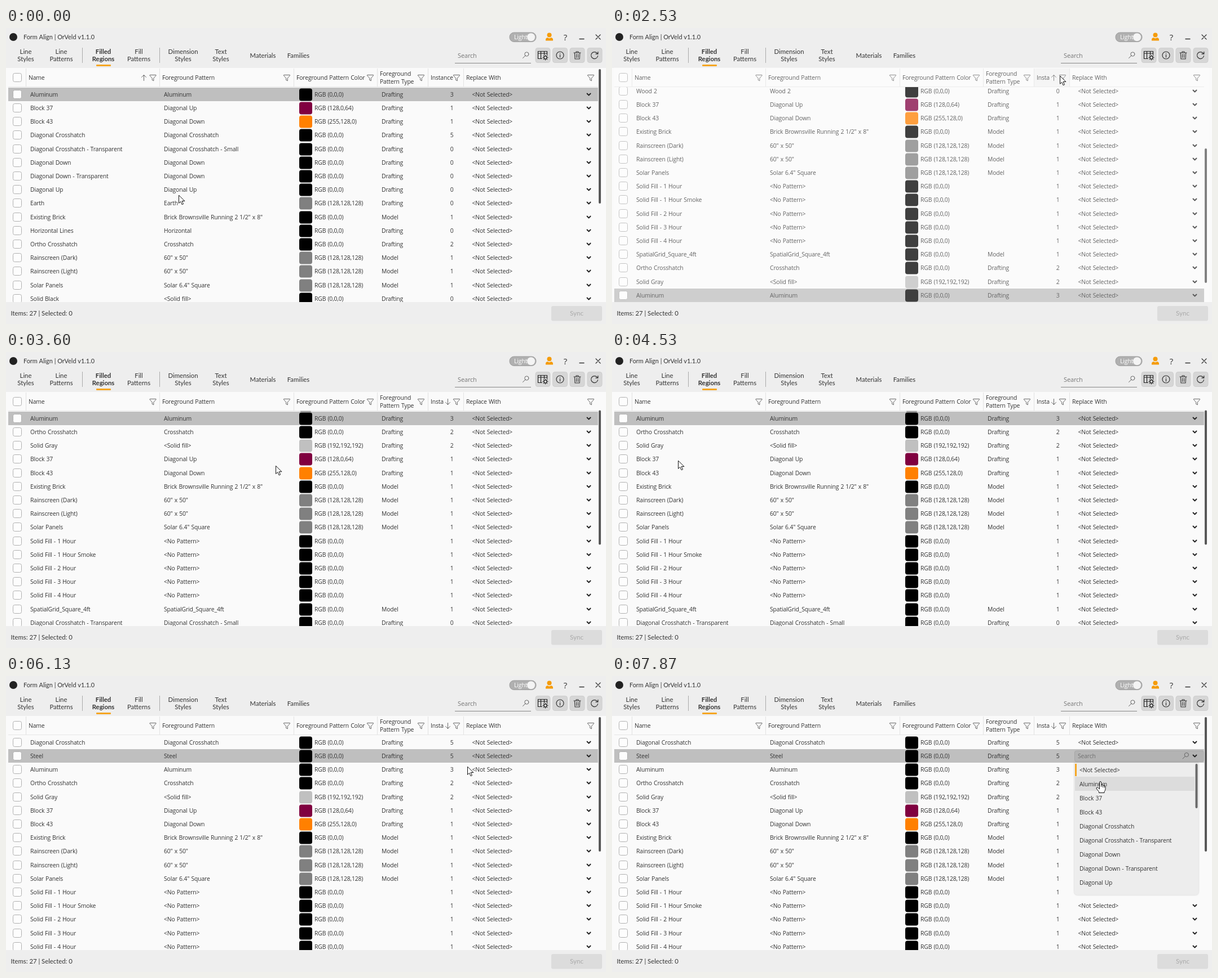
These frames come from a looping animation (1064 px wide and 526 px high, 8 s). An HTML page with a canvas:

```html
<!DOCTYPE html>
<html lang="en">
<head>
<meta charset="utf-8">
<title>Filled regions table</title>
<style>
html, body { margin: 0; width: 100%; height: 100%; overflow: hidden; background: #eee; }
canvas { display: block; width: 1064px; height: 526px; }
</style>
</head>
<body>
<canvas id="stage"></canvas>
<script>
const W = 1064, H = 526, LOOP = 8000, STEP = 1000 / 15;
const ROW = 24.2, TOP = 117.8, BOTTOM = 487;
const INK = '#333', ORANGE = '#f5a623';
const UI = '"Open Sans", "Noto Sans", sans-serif', BRAND = 'Lato, "Open Sans", sans-serif';

const canvas = document.getElementById('stage');
const ctx = canvas.getContext('2d');
const dpr = window.devicePixelRatio || 1;
canvas.width = W * dpr;
canvas.height = H * dpr;

// name | pattern | color | type | instances
const rows = `Aluminum|Aluminum|0,0,0|Drafting|3
Block 37|Diagonal Up|128,0,64|Drafting|1
Block 43|Diagonal Down|255,128,0|Drafting|1
Diagonal Crosshatch|Diagonal Crosshatch|0,0,0|Drafting|5
Diagonal Crosshatch - Transparent|Diagonal Crosshatch - Small|0,0,0|Drafting|0
Diagonal Down|Diagonal Down|0,0,0|Drafting|0
Diagonal Down - Transparent|Diagonal Down|0,0,0|Drafting|0
Diagonal Up|Diagonal Up|0,0,0|Drafting|0
Earth|Earth|128,128,128|Drafting|0
Existing Brick|Brick Brownsville Running 2 1/2" x 8"|0,0,0|Model|1
Horizontal Lines|Horizontal|0,0,0|Drafting|0
Ortho Crosshatch|Crosshatch|0,0,0|Drafting|2
Rainscreen (Dark)|60" x 50"|128,128,128|Model|1
Rainscreen (Light)|60" x 50"|128,128,128|Model|1
Solar Panels|Solar 6.4" Square|128,128,128|Model|1
Solid Black|<Solid fill>|0,0,0|Drafting|0
Solid Fill - 1 Hour|<No Pattern>|0,0,0||1
Solid Fill - 1 Hour Smoke|<No Pattern>|0,0,0||1
Solid Fill - 2 Hour|<No Pattern>|0,0,0||1
Solid Fill - 3 Hour|<No Pattern>|0,0,0||1
Solid Fill - 4 Hour|<No Pattern>|0,0,0||1
Solid Gray|<Solid fill>|192,192,192|Drafting|2
Solid White|<Solid fill>|255,255,255|Drafting|0
SpatialGrid_Square_4ft|SpatialGrid_Square_4ft|0,0,0|Model|1
Steel|Steel|0,0,0|Drafting|5
Wood 1|Wood 1|0,0,0|Drafting|0
Wood 2|Wood 2|0,0,0|Drafting|0`.split('\n').map(line => {
  const [name, pattern, color, type, count] = line.split('|');
  return { name, pattern, color, type, count: +count };
});
const orders = {
  name: rows,
  up: [...rows].sort((a, b) => a.count - b.count),
  down: [...rows].sort((a, b) => b.count - a.count)
};

// pointer path: step, x, y
const path = [
  [0, 306, 297], [3, 400, 268], [6, 474, 190], [8, 410, 122], [11, 210, 117], [13, 123, 138],
  [17, 215, 112], [21, 425, 86], [25, 634, 74], [26, 641, 73], [28, 700, 75], [31, 794, 85], [47, 794, 85],
  [48, 791, 98], [49, 782, 124], [52, 620, 200], [56, 340, 190], [59, 205, 165],
  [60, 205, 165], [65, 118, 138], [66, 118, 138], [67, 109, 166], [68, 117, 193], [72, 117, 193],
  [73, 112, 172], [74, 107, 151], [75, 107, 151], [78, 190, 350], [81, 320, 460], [84, 460, 380], [88, 611, 166],
  [89, 680, 166], [92, 818, 161], [96, 872, 150], [101, 888, 140], [106, 880, 150], [112, 880, 150],
  [116, 864, 191], [121, 864, 191]
];

function slope(i, c) {
  const a = path[i - 1], p = path[i], b = path[i + 1];
  if (!a || !b || a[c] === p[c] || b[c] === p[c]) return 0;
  return (b[c] - a[c]) / (b[0] - a[0]);
}

function pointerAt(k) {
  let i = 0;
  while (i < path.length - 2 && k >= path[i + 1][0]) i++;
  const a = path[i], b = path[i + 1], d = b[0] - a[0], u = (k - a[0]) / d;
  return [1, 2].map(c =>
    (2 * u ** 3 - 3 * u * u + 1) * a[c] + (u ** 3 - 2 * u * u + u) * d * slope(i, c) +
    (3 * u * u - 2 * u ** 3) * b[c] + (u ** 3 - u * u) * d * slope(i + 1, c));
}

function stateAt(k) {
  return {
    sort: k < 38 ? 'name' : k < 50 ? 'up' : 'down',
    offset: k < 38 ? 0 : k < 50 ? 223.8 : k < 70 ? 2 * ROW : k < 71 ? ROW : 0,
    veil: k < 35 || k > 38 ? 0 : k < 38 ? 0.5 : 0.25,
    selected: k < 76 ? 'Aluminum' : 'Steel',
    hover: k >= 20 && k < 26 ? 'pattern' : k >= 30 && k < 50 ? 'instance' : '',
    open: k < 102 ? 0 : Math.min(1, (k - 101) / 5),
    item: k >= 115 ? 1 : -1,
    hand: k >= 118
  };
}

function text(s, x, y, o = {}) {
  ctx.font = `${o.weight || 400} ${o.size || 10.4}px ${o.font || UI}`;
  ctx.letterSpacing = o.font ? '0px' : '-0.15px';
  ctx.wordSpacing = o.font ? '0px' : '0.6px';
  ctx.textAlign = o.align || 'left';
  ctx.fillStyle = o.color || INK;
  ctx.fillText(s, x, y);
}
const brand = (s, x, y, o = {}) => text(s, x, y, { font: BRAND, size: 11.3, ...o });

function rect(x, y, w, h, color) {
  ctx.fillStyle = color;
  ctx.fillRect(x, y, w, h);
}

function box(x, y, w, h, r, fill, line) {
  ctx.beginPath();
  ctx.roundRect(x, y, w, h, r);
  if (fill) { ctx.fillStyle = fill; ctx.fill(); }
  if (line) { ctx.strokeStyle = line; ctx.lineWidth = 1; ctx.stroke(); }
}

function disc(x, y, r, color) {
  ctx.beginPath();
  ctx.arc(x, y, r, 0, 7);
  ctx.fillStyle = color;
  ctx.fill();
}

// stroke or fill an SVG path at a position
function glyph(d, x, y, line, width = 1, fill) {
  const p = new Path2D(d);
  ctx.save();
  ctx.translate(x, y);
  ctx.lineJoin = ctx.lineCap = 'round';
  if (fill) { ctx.fillStyle = fill; ctx.fill(p); }
  if (line) { ctx.strokeStyle = line; ctx.lineWidth = width; ctx.stroke(p); }
  ctx.restore();
}

const funnel = (x, color = '#666') => glyph('M-5-5H5.5V-4L1.3.7V5.3L-1.3 4V.7L-5.5-4Z', x, 88.5, color);
const sortArrow = (x, up) =>
  glyph(up ? 'M0 5V-5M-4-1L0-5L4-1' : 'M0-5V5M-4 1L0 5L4 1', x, 88.5, '#666');
const lens = (x, y) => glyph('M5.5-2A3.6 3.6 0 1 1-1.7-2A3.6 3.6 0 1 1 5.5-2M-.6.7L-5 5', x, y, '#666');
const chevron = y => glyph('M-3-1.5L0 1.5L3-1.5', 1033.5, y, '#222', 1.9);
const checkbox = y => box(12.5, y - 7.5, 15, 15, 3, '#fdfdfd', '#b0b0b0');

function drawTitleBar() {
  disc(13, 16, 7, '#222');
  brand('Form Align | OrVeld v1.1.0', 31, 20, { size: 10.9 });
  box(893, 8, 47, 16.5, 8, '#b0b0b0', '#9c9c9c');
  text('Light', 901, 20, { color: '#fff', size: 10.5 });
  disc(931, 16.3, 7, '#f4f4f4');
  disc(963.5, 12.5, 4, '#f59c0b');
  glyph('M-6.5 6V4Q-6.5 1-3 .5Q0 3 3 .5Q6.5 1 6.5 4V6Z', 963.5, 16.5, null, 0, '#f59c0b');
  text('?', 992, 21.5, { size: 15, align: 'center' });
  glyph('M-4 0H4', 1021, 19.5, INK, 1.3);
  glyph('M-4-4L4 4M4-4L-4 4', 1050, 16, INK, 1.2);
}

function drawTabs() {
  const tabs = [[35, 'Line', 'Styles'], [98, 'Line', 'Patterns'], [172.5, 'Filled', 'Regions'],
    [235.5, 'Fill', 'Patterns'], [314, 'Dimension', 'Styles'], [381, 'Text', 'Styles']];
  for (const [x, a, b] of tabs) {
    const o = { align: 'center', weight: a === 'Filled' ? 700 : 400 };
    brand(a, x, 46, o);
    brand(b, x, 59, o);
  }
  brand('Materials', 455.5, 52.5, { align: 'center' });
  brand('Families', 518.5, 52.5, { align: 'center' });
  rect(135, 35, 1, 27, '#aaa');
  rect(272, 35, 1, 27, '#aaa');
  box(160, 65, 26, 3, 1, ORANGE);

  text('Search', 801, 52.5, { color: '#777', size: 11 });
  rect(796, 62, 135, 1, '#888');
  lens(921.5, 48.5);

  for (const x of [952, 982.5, 1013, 1044])
    box(x - 13, 35.5, 26, 26, 4, '#d6d6d6', '#cecece');
  glyph('M-1 6H-8V-7H8V-1M-8-3.5H8M-3-7V6M3-7V-1', 951.5, 48.5, '#222', 1.2);
  glyph('M2.5 0A2.5 2.5 0 1 1-2.5 0A2.5 2.5 0 1 1 2.5 0M0-4.5V-3M0 3V4.5M-4.5 0H-3M3 0H4.5M-3-3L-2-2M3-3L2-2M-3 3L-2 2M3 3L2 2',
    956.5, 52.5, '#222', 1.2);
  glyph('M6.5 0A6.5 6.5 0 1 1-6.5 0A6.5 6.5 0 1 1 6.5 0M0-1V3.5M0-3.4V-3.2', 982.5, 48.5, INK, 1.2);
  glyph('M-6-4.5H6M-2-4.5V-6.5H2V-4.5M-4.7-4.5L-4 6.5H4L4.7-4.5M-1.5-2V4M1.5-2V4', 1013, 48.5, INK, 1.1);
  glyph('M6 1A6 6 0 1 1 4.5-4L6-2.5M6.3-6.2V-2.3H2.4', 1043.5, 48.5, INK, 1.2);
}

function drawHeader(s) {
  if (s.hover === 'pattern') rect(273, 72, 237, 32, '#f0f0f0');
  if (s.hover === 'instance') rect(749, 72, 62, 32, '#f2f2f2');
  for (const x of [35, 272, 510, 658, 748, 811]) rect(x, 72, 1, 32, '#e2e2e2');
  rect(4, 104, 1046, 1, '#e6e6e6');
  checkbox(88);
  text('Name', 40, 92);
  text('Foreground Pattern', 277, 92);
  text('Foreground Pattern Color', 515, 92);
  text('Foreground', 663, 85);
  text('Pattern Type', 663, 99);
  text(s.sort === 'name' ? 'Instance' : 'Insta', 753, 92);
  text('Replace With', 816, 92);
  for (const x of [260.5, 498, 646, 736, 799, 1037])
    funnel(x, x === 498 && s.hover === 'pattern' ? '#222' : '#666');
  if (s.sort === 'name') sortArrow(244.5, true);
  else sortArrow(783.5, s.sort === 'up');
}

function drawRow(r, y, s) {
  const base = y + 4;
  if (r.name === s.selected) rect(4, y - 12, 1046, 24, '#bfbfbf');
  checkbox(y);
  text(r.name, 43, base);
  text(r.pattern, 280, base);
  box(520, y - 10.5, 23, 22, 4, `rgb(${r.color})`);
  text(`RGB (${r.color})`, 547, base);
  text(r.type, 666, base);
  text(r.count, 793.5, base, { align: 'right' });
  if (s.open && r.name === s.selected) {
    box(820.5, y - 9, 229, 19, 3, '#b3b3b3', '#a6a6a6');
    text('Search', 826, base, { color: '#717171' });
    lens(1017, y);
  } else text('<Not Selected>', 826.5, base);
  chevron(y);
}

function drawGrid(s) {
  rect(0, 71, W, BOTTOM - 71, '#fafafa');
  drawHeader(s);
  ctx.save();
  ctx.beginPath();
  ctx.rect(0, 105, W, BOTTOM - 105);
  ctx.clip();
  orders[s.sort].forEach((r, i) => {
    const y = Math.round(TOP + i * ROW - s.offset);
    if (y > 90 && y < 500) drawRow(r, y, s);
  });
  ctx.restore();
  box(1051, 73 + s.offset * 0.63, 4, 239, 2, '#585858');
  if (s.veil) rect(3, 70, 1055, BOTTOM - 70, `rgba(250,250,250,${s.veil})`);
}

function drawMenu(s) {
  if (!s.open) return;
  const h = 235 * (1 - (1 - s.open) ** 2);
  ctx.save();
  ctx.shadowColor = 'rgba(0,0,0,.2)';
  ctx.shadowBlur = 3;
  box(820, 154, 220, h, [0, 0, 5, 5], '#ededed');
  ctx.restore();
  ctx.save();
  ctx.beginPath();
  ctx.rect(820, 154, 220, h - 1);
  ctx.clip();
  if (s.item >= 0) rect(821, 154 + s.item * 25, 212, 25, '#dcdcdc');
  rect(821, 156, 3, 22, ORANGE);
  ['<Not Selected>', ...rows.slice(0, 9).map(r => r.name)].forEach((name, i) =>
    text(name, 829, 171 + i * 25));
  box(1034.5, 156, 4, 79, 2, '#6a6a6a');
  ctx.restore();
}

function drawFooter() {
  rect(0, BOTTOM, W, H - BOTTOM, '#eee');
  brand('Items: 27 | Selected: 0', 8.5, 511);
  box(967, 494, 90, 26.5, 3, '#dcdcdc');
  brand('Sync', 1012, 511, { align: 'center', color: '#aaa', size: 11.6 });
}

function drawPointer(k, hand) {
  const [x, y] = pointerAt(k);
  if (hand)
    glyph('M-1.5 13V1.5Q-1.5 0 0 0Q1.5 0 1.5 1.5V6Q4 4.5 4.3 6.5Q6.5 5.5 7 7.5Q9 7 9 9.5V13Q9 16 7 18V20H-2.5V18L-7 12.5Q-7.5 10-5 10.5ZM1.5 6V9M4.3 6.5V10M7 7.5V10.5',
      866, 187.5, '#111', 1, '#fff');
  else
    glyph('M0 0V13.8L3.2 10.8L5.6 16.2L8 15.2L5.6 10H10Z', x + 0.5, y + 0.5, '#111', 1, '#fff');
}

function draw(now) {
  const k = Math.floor((now % LOOP + 5) / STEP);
  const s = stateAt(k);
  ctx.setTransform(dpr, 0, 0, dpr, 0, 0);
  rect(0, 0, W, H, '#eee');
  drawTitleBar();
  drawTabs();
  drawGrid(s);
  drawFooter();
  drawMenu(s);
  drawPointer(k, s.hand);
}

const start = performance.now();
function tick() {
  draw(performance.now() - start);
  requestAnimationFrame(tick);
}
tick();
</script>
</body>
</html>
```
